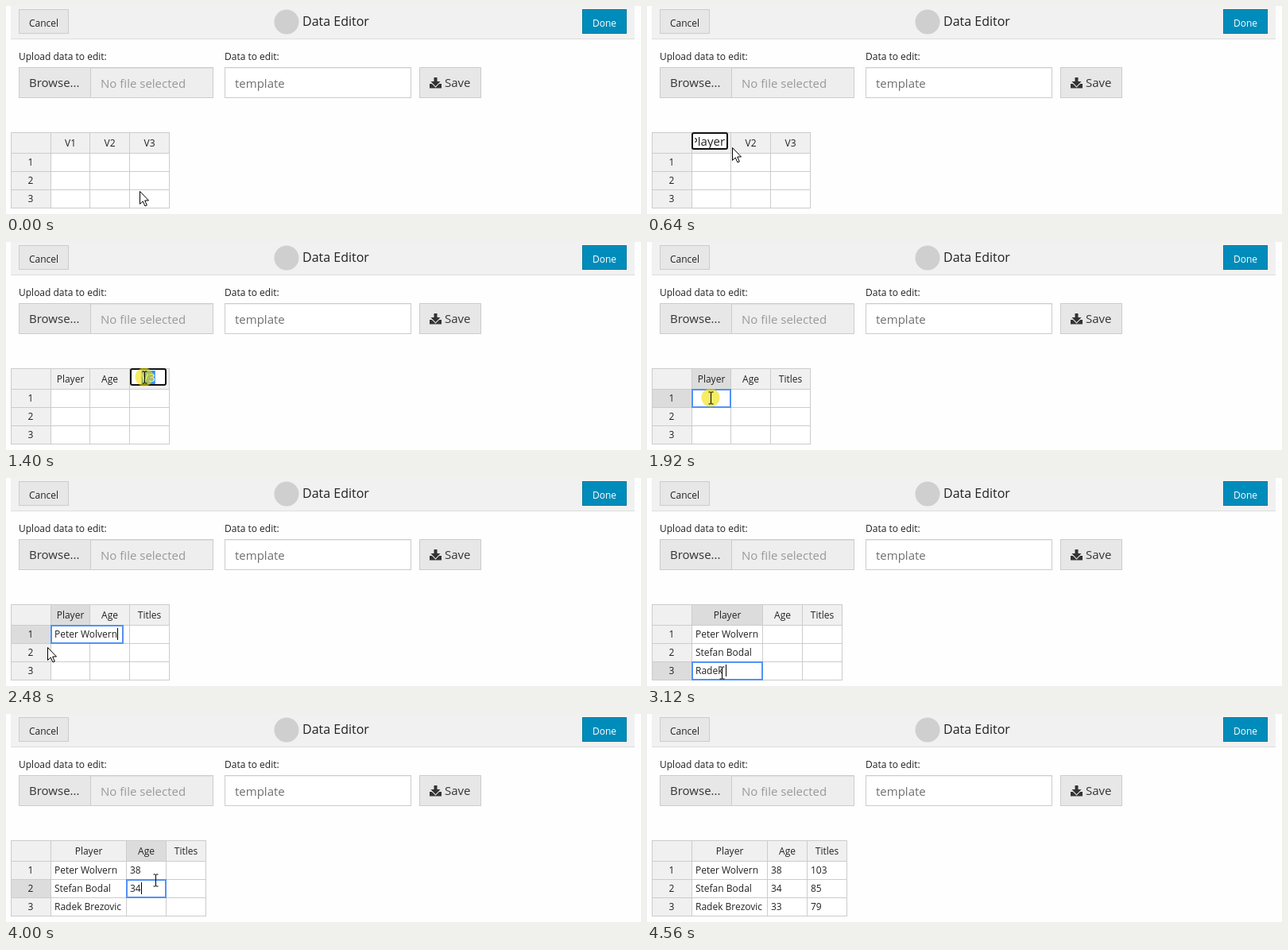
These frames come from a looping animation (799x262 px, 4.64 s). An HTML page:

```html
<!DOCTYPE html>
<html lang="en">
<head>
<meta charset="utf-8">
<title>Data Editor</title>
<style>
  html, body { margin: 0; width: 100%; height: 100%; overflow: hidden; background: #fefefe; }
  svg { display: block; font: 12px "Open Sans", sans-serif; fill: #222; }
  .big { font-size: 15px; }
  .mid { text-anchor: middle; }
  .box { stroke: #ccc; fill: #e7e7e7; }
</style>
</head>
<body>
<svg width="799" height="262" viewBox="0 0 799 262">
  <rect x="6" width="785" height="41" fill="#f1f1f1"/>
  <rect x="6" y="41" width="785" height="1" fill="#ddd"/>
  <rect class="box" x="16.5" y="4.5" width="62" height="30"/>
  <text x="29" y="26">Cancel</text>
  <circle cx="353" cy="20" r="15.5" fill="#cfcfcf"/>
  <text x="373" y="25" font-size="16">Data Editor</text>
  <rect x="725.5" y="4.5" width="55" height="30" fill="#008cba" stroke="#0079a1"/>
  <text x="738" y="26" fill="#fff">Done</text>

  <text x="16" y="68">Upload data to edit:</text>
  <text x="275" y="68">Data to edit:</text>
  <rect class="box" x="106.5" y="77.5" width="154" height="38" style="fill:#eee"/>
  <rect class="box" x="16.5" y="77.5" width="90" height="38"/>
  <rect class="box" x="275.5" y="77.5" width="234" height="38" style="fill:#fff"/>
  <path d="M107 78.5h153M276 78.5h233" stroke="#000" stroke-opacity=".06"/>
  <rect class="box" x="520.5" y="77.5" width="77" height="38"/>
  <g class="big">
    <text x="29" y="102" fill="#333">Browse...</text>
    <text x="119" y="103" fill="#999">No file selected</text>
    <text x="288" y="103" fill="#6f6f6f">template</text>
    <text x="552" y="102" fill="#333">Save</text>
  </g>
  <path d="M533 98h15v5.5h-15z" fill="#333"/>
  <path d="M538.5 90h4v5h4l-6 6.2-6-6.2h4z" fill="#333" stroke="#e7e7e7" stroke-width="2" paint-order="stroke"/>
  <g id="sheet"></g>
</svg>
<script>
const LOOP = 4640, STEP = 40;
const rowY = [159, 185, 208, 231, 254];
const sheet = document.getElementById('sheet');
const ruler = document.createElement('canvas').getContext('2d');

// column, row (0 = header), text, open, typing from, typing to, close
const edits = [
  [1, 0, 'Player', 200, 320, 560, 760],
  [2, 0, 'Age', 760, 840, 960, 1080],
  [3, 0, 'Titles', 1360, 1440, 1720, 1880],
  [1, 1, 'Peter Wolvern', 1920, 2000, 2400, 2520],
  [1, 2, 'Stefan Bodal', 2520, 2560, 2800, 2840],
  [1, 3, 'Radek Brezovic', 2840, 2920, 3360, 3440],
  [2, 1, '38', 3520, 3600, 3760, 3840],
  [2, 2, '34', 3840, 3880, 3960, 4040],
  [2, 3, '33', 4040, 4080, 4120, 4160],
  [3, 1, '103', 4200, 4220, 4280, 4320],
  [3, 2, '85', 4320, 4340, 4380, 4400],
  [3, 3, '79', 4400, 4420, 4480, 4520]
].map(([col, row, text, open, from, to, close]) => ({ col, row, text, open, from, to, close }));

// time, x, y
const pointer = [
  [0, 168, 233], [40, 168, 233], [180, 80, 171], [560, 80, 171], [640, 107, 178],
  [720, 129, 171], [960, 129, 171], [1080, 232, 178], [1140, 232, 178], [1320, 174, 170],
  [1760, 174, 170], [1880, 80, 196], [2240, 80, 198], [2480, 52, 213], [2800, 52, 215],
  [2920, 52, 243], [3080, 94, 245], [3360, 94, 245], [3480, 180, 197], [3640, 180, 197],
  [3840, 188, 209], [4040, 188, 209], [4160, 226, 197], [4520, 226, 197]
];
const clicks = [[160, 280], [720, 800], [1060, 1140], [1320, 1420], [1880, 1960], [3460, 3540], [4160, 4240]];

const rect = (x, y, w, h, attrs) => `<rect x="${x}" y="${y}" width="${w}" height="${h}" ${attrs}/>`;
const label = (x, y, text, attrs = '') => `<text x="${x}" y="${y}" xml:space="preserve" ${attrs}>${text}</text>`;
const during = (t, from, to) => t >= from && t < to;

function width(text, size) {
  ruler.font = `${size}px "Open Sans", sans-serif`;
  return ruler.measureText(text).width;
}

function pointerAt(t) {
  const i = pointer.findIndex(p => p[0] > t);
  const [t0, x0, y0] = pointer[i - 1], [t1, x1, y1] = pointer[i];
  const u = (t - t0) / (t1 - t0), k = u * u * (3 - 2 * u);
  return [Math.round(x0 + (x1 - x0) * k), Math.round(y0 + (y1 - y0) * k)];
}

function grid(t, colX, active) {
  const right = colX[4];
  let out = rect(6, 159, right - 6, 95, 'fill="#fff"') +
    rect(6, 159, right - 6, 26, 'fill="#f0f0f0"') + rect(6, 159, 50, 95, 'fill="#f0f0f0"');
  if (active && active.row) {
    const { col, row } = active;
    out += rect(colX[col], 159, colX[col + 1] - colX[col], 26, 'fill="#dcdcdc"') +
      rect(6, rowY[row], 50, rowY[row + 1] - rowY[row], 'fill="#dcdcdc"');
  }
  const lines = rowY.map(y => `M6 ${y + .5}H${right + 1}`).concat(colX.map(x => `M${x + .5} 159V255`));
  out += `<path d="${lines.join('')}" stroke="#ccc" fill="none"/>`;
  for (let i = 1; i < 4; i++) {
    const title = edits[i - 1];
    out += label((colX[i] + colX[i + 1] + 1) / 2, 177, t < title.close ? 'V' + i : title.text, 'class="mid"');
    out += label(31, rowY[i] + 16, i, 'class="mid"');
  }
  for (const e of edits) if (e.row && t >= e.close) out += label(colX[e.col] + 5, rowY[e.row] + 16, e.text);
  return out;
}

function headerInput(x, typed, col) {
  const text = typed || 'V' + col, w = width(text, 15);
  const left = w > 38 ? x + 42 - w : x + 23 - w / 2;
  return rect(x + 1, 160, 44, 20, 'rx="2" fill="#fff" stroke="#111" stroke-width="2"') +
    (typed ? '' : rect(left, 162, w, 17, 'fill="#3390ff"')) +
    `<clipPath id="field"><rect x="${x + 4}" y="160" width="39" height="20"/></clipPath>` +
    `<g clip-path="url(#field)">${label(left, 176, text, `class="big" fill="${typed ? '#222' : '#fff'}"`)}</g>`;
}

function cellInput(x, y, w, typed) {
  const end = Math.round(x + 5 + width(typed, 12));
  return rect(x + 1, y + 1, w - 1, 22, 'fill="#fff" stroke="#5292f7" stroke-width="2"') +
    label(x + 5, y + 16, typed) +
    (typed ? rect(end, y + 4, 1, 15, 'fill="#000"') : '');
}

function draw(t) {
  const nameWidth = t < 2520 ? 49 : t < 3440 ? 89 : 95;
  const colX = [6, 56, 56 + nameWidth, 106 + nameWidth, 156 + nameWidth];
  const active = edits.find(e => during(t, e.open, e.close));
  let out = grid(t, colX, active), box;

  if (active) {
    const { col, row, text, from, to } = active;
    const share = Math.min(1, Math.max(0, (t - from) / (to - from)));
    const typed = text.slice(0, Math.floor(text.length * share));
    const x = colX[col], y = rowY[row];
    if (row) {
      const w = Math.max(colX[col + 1] - x, Math.round(width(typed, 12)) + 12);
      out += cellInput(x, y, w, typed);
      box = [x, y, w, 23];
    } else {
      const left = col > 1 ? x + 1 : x;
      out += headerInput(left, typed, col);
      box = [left, y, 46, 18];
    }
  }

  if (t < 4520) {
    const [x, y] = pointerAt(t);
    if (clicks.some(c => during(t, ...c))) out += `<circle cx="${x}" cy="${y}" r="11.5" fill="#f0e000" fill-opacity=".6"/>`;
    const inside = box && during(x, box[0], box[0] + box[2]) && during(y, box[1], box[1] + box[3]);
    out += `<g transform="translate(${x + .5} ${y + .5})" stroke="#000">` + (inside
      ? '<path d="M-3-7.5h2.5l.5.5.5-.5H3M-3 7.5h2.5L0 7l.5.5H3M0-7V7" fill="none"/>'
      : '<path d="M0 0V16l3.7-3.5L6.5 18.5l2.3-1L6.2 11.5H11z" fill="#fff"/>') + '</g>';
  }
  sheet.innerHTML = out;
}

const start = performance.now();
function tick() {
  draw(Math.floor(((performance.now() - start) % LOOP) / STEP) * STEP);
  requestAnimationFrame(tick);
}
tick();
</script>
</body>
</html>
```
